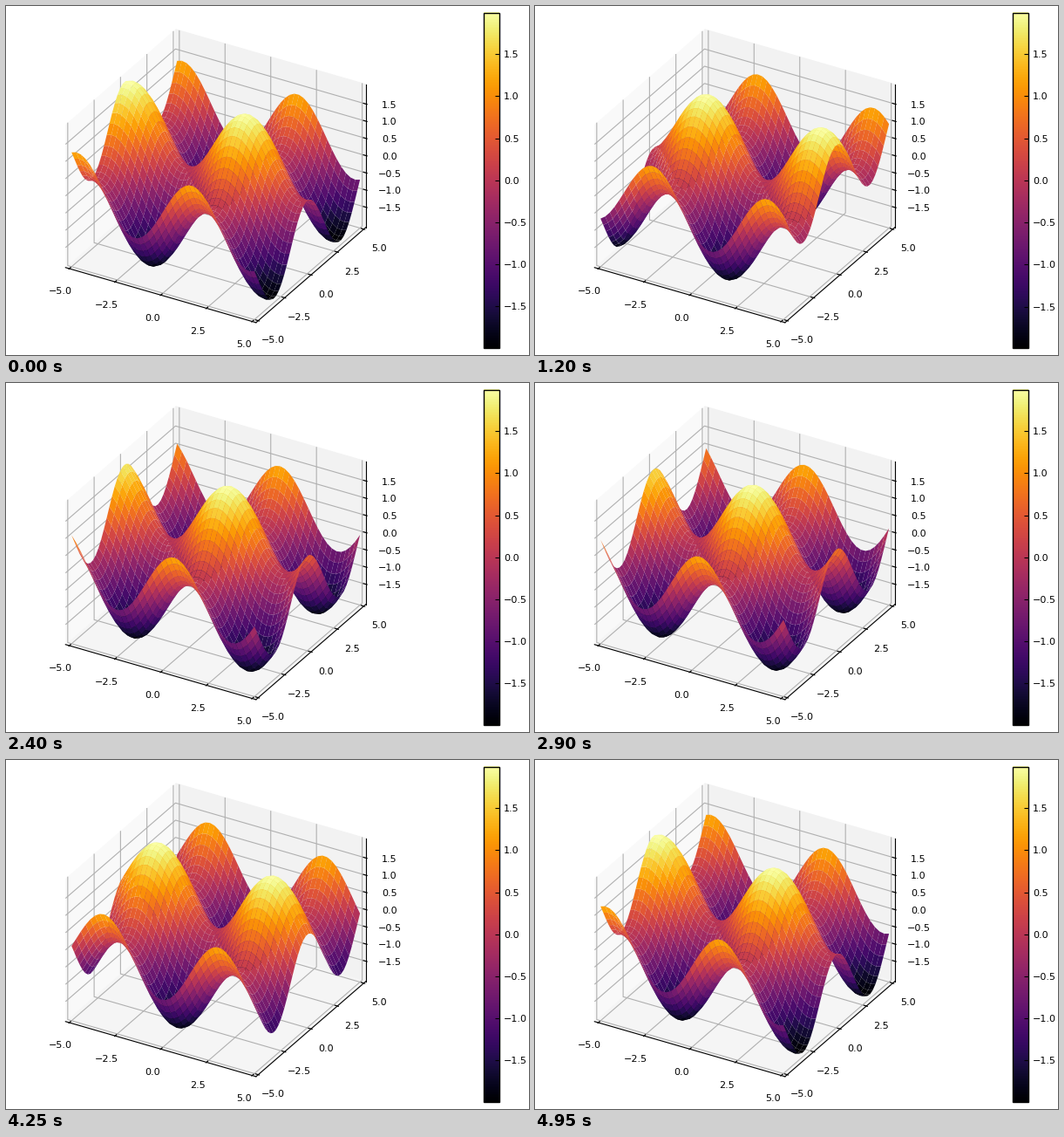
Recreate the animation shown at these times as a matplotlib script. Size 600 px wide and 400 px high, loop 5000 ms.

```python
import numpy as np
import matplotlib.pyplot as plt
from matplotlib.animation import FuncAnimation
from matplotlib.collections import LineCollection, PolyCollection
from matplotlib.patches import Rectangle

W, H, DPI = 600, 400, 100
FRAMES, INTERVAL = 100, 50
MM, PT = DPI / 25.4, DPI / 72

# Orthographic view of a 4:4:3 box in a square view 1 mm inside the figure
ELEV, AZIM = np.radians(30), np.radians(-60)
VIEW = H - 2 * MM
BOX = 0.6435 * VIEW
CENTER = (240.65, MM + 0.4865 * VIEW)
SPAN = BOX * 0.96            # data range inside the padded box
UNIT = SPAN / 10             # x and y run from -5 to 5
HEIGHT = 0.75 * SPAN
EDGE = 5 / 0.96              # padded limit in x and y
TOP = 0.5 / 0.96             # padded limit in normalised height

XY_TICKS = np.linspace(-5, 5, 5)
Z_TICKS = np.linspace(-1.5, 1.5, 7)
TICK_OUT, TICK_IN = 1 / 12, 2 / 12
LABEL_PAD = 0.8146           # in x and y units
LABEL_DROP = LABEL_PAD / 10  # the same share of the height
BAR_X0, BAR_X1, BAR_Y0, BAR_Y1 = 548, 566, 2 * MM, H - 2 * MM

plt.rcParams["font.family"] = "DejaVu Sans"
plt.rcParams["font.size"] = 8
CMAP = plt.get_cmap("inferno")


def project(x, y, h):
    """Screen position of a point; h is the height scaled to -0.5..0.5."""
    x, y, h = np.broadcast_arrays(x, y, h)
    right = UNIT * (-np.sin(AZIM) * x + np.cos(AZIM) * y)
    up = (-UNIT * np.sin(ELEV) * (np.cos(AZIM) * x + np.sin(AZIM) * y)
          + HEIGHT * np.cos(ELEV) * h)
    return np.stack([CENTER[0] + right, CENTER[1] - up], axis=-1)


def path(*points):
    return project(*np.array(points, dtype=float).T)


def nearness(x, y, h):
    flat = np.cos(AZIM) * x + np.sin(AZIM) * y
    return UNIT * np.cos(ELEV) * flat + HEIGHT * np.sin(ELEV) * h


def corners(a):
    return np.stack([a[:-1, :-1], a[1:, :-1], a[1:, 1:], a[:-1, 1:]], axis=2)


def cell_mean(a):
    return corners(a).mean(axis=2).ravel()


def label(value, pos=(0, 0), ha="center", va="top"):
    text = f"{value:.1f}".replace("-", "\u2212")
    return ax.text(*pos, text, ha=ha, va=va)


def lines(segments, color, zorder):
    group = LineCollection(segments, colors=color, linewidths=0.8, zorder=zorder)
    ax.add_collection(group)
    return group


fig = plt.figure(figsize=(W / DPI, H / DPI), dpi=DPI, facecolor="white")
ax = fig.add_axes([0, 0, 1, 1])
ax.set_axis_off()

# Panes
E, T = EDGE, TOP
panes = [
    ([(-E, -E, -T), (-E, E, -T), (-E, E, T), (-E, -E, T)], "0.975"),
    ([(-E, E, -T), (E, E, -T), (E, E, T), (-E, E, T)], "0.95"),
    ([(-E, -E, -T), (E, -E, -T), (E, E, -T), (-E, E, -T)], "0.9625"),
]
for pts, shade in panes:
    ax.add_collection(PolyCollection([path(*pts)], facecolors=shade,
                                     edgecolors=shade, linewidths=1, zorder=1))

# Fixed grid, ticks and labels in x and y
grid, ticks = [], []
for t in XY_TICKS:
    grid.append(path((t, -E, -T), (t, E, -T), (t, E, T)))
    grid.append(path((E, t, -T), (-E, t, -T), (-E, t, T)))
    ticks.append(path((t, -E - TICK_OUT, -T), (t, -E + TICK_IN, -T)))
    ticks.append(path((E + TICK_OUT, t, -T), (E - TICK_IN, t, -T)))
    label(t, project(t, -E - LABEL_PAD, -T - LABEL_DROP))
    label(t, project(E + LABEL_PAD, t, -T - LABEL_DROP))
lines(grid, "#b0b0b0", 2)
lines(ticks, "black", 4)

z_grid = lines([], "#b0b0b0", 2)
z_marks = lines([], "black", 4)
z_labels = [label(v) for v in Z_TICKS]

for a, b in [((-E, -E, -T), (E, -E, -T)), ((E, -E, -T), (E, E, -T)),
             ((E, E, -T), (E, E, T))]:
    ax.plot(*path(a, b).T, color="black", lw=0.8, zorder=3)

# Surface
side = np.linspace(-5, 5, 40)
X, Y = np.meshgrid(side, side)
surface = PolyCollection([], linewidths=0, edgecolors="none",
                         antialiaseds=True, zorder=5)
ax.add_collection(surface)

# Colour bar
ax.imshow(np.linspace(1, 0, 256)[:, None], cmap=CMAP, aspect="auto",
          extent=(BAR_X0, BAR_X1, BAR_Y1, BAR_Y0), interpolation="nearest",
          zorder=2)
ax.add_patch(Rectangle((BAR_X0, BAR_Y0), BAR_X1 - BAR_X0, BAR_Y1 - BAR_Y0,
                       fill=False, ec="black", lw=1, zorder=4))
bar_marks = lines([], "black", 4)
bar_labels = [label(v, ha="left", va="center_baseline") for v in Z_TICKS]

ax.set_xlim(0, W)
ax.set_ylim(H, 0)


def update(n):
    phase = 10 * np.sin(2 * np.pi * n / (FRAMES - 1))
    Z = np.sin(X + phase) + np.cos(Y)
    low, high = Z.min(), Z.max()
    level = (Z - low) / (high - low)
    h = level - 0.5

    order = np.argsort(nearness(cell_mean(X), cell_mean(Y), cell_mean(h)))
    quads = corners(project(X, Y, h)).reshape(-1, 4, 2)
    surface.set_verts(quads[order])
    surface.set_facecolor(CMAP(cell_mean(level)[order]))

    # Height ticks follow the current data range
    rails, marks, bar = [], [], []
    for v, text, bar_text in zip(Z_TICKS, z_labels, bar_labels):
        f = (v - low) / (high - low)
        k = f - 0.5
        rails.append(path((E, E, k), (-E, E, k), (-E, -E, k)))
        marks.append(path((E + TICK_OUT, E, k), (E - TICK_IN, E, k)))
        text.set_position(project(E + LABEL_PAD, E + LABEL_PAD, k))
        y = BAR_Y1 - f * (BAR_Y1 - BAR_Y0)
        bar.append([(BAR_X1 - 3.5 * PT, y), (BAR_X1, y)])
        bar_text.set_position((BAR_X1 + 3.5 * PT, y))
    z_grid.set_segments(rails)
    z_marks.set_segments(marks)
    bar_marks.set_segments(bar)
    return []


anim = FuncAnimation(fig, update, frames=FRAMES, interval=INTERVAL,
                     repeat=True, repeat_delay=0, blit=False)
plt.show()
```
